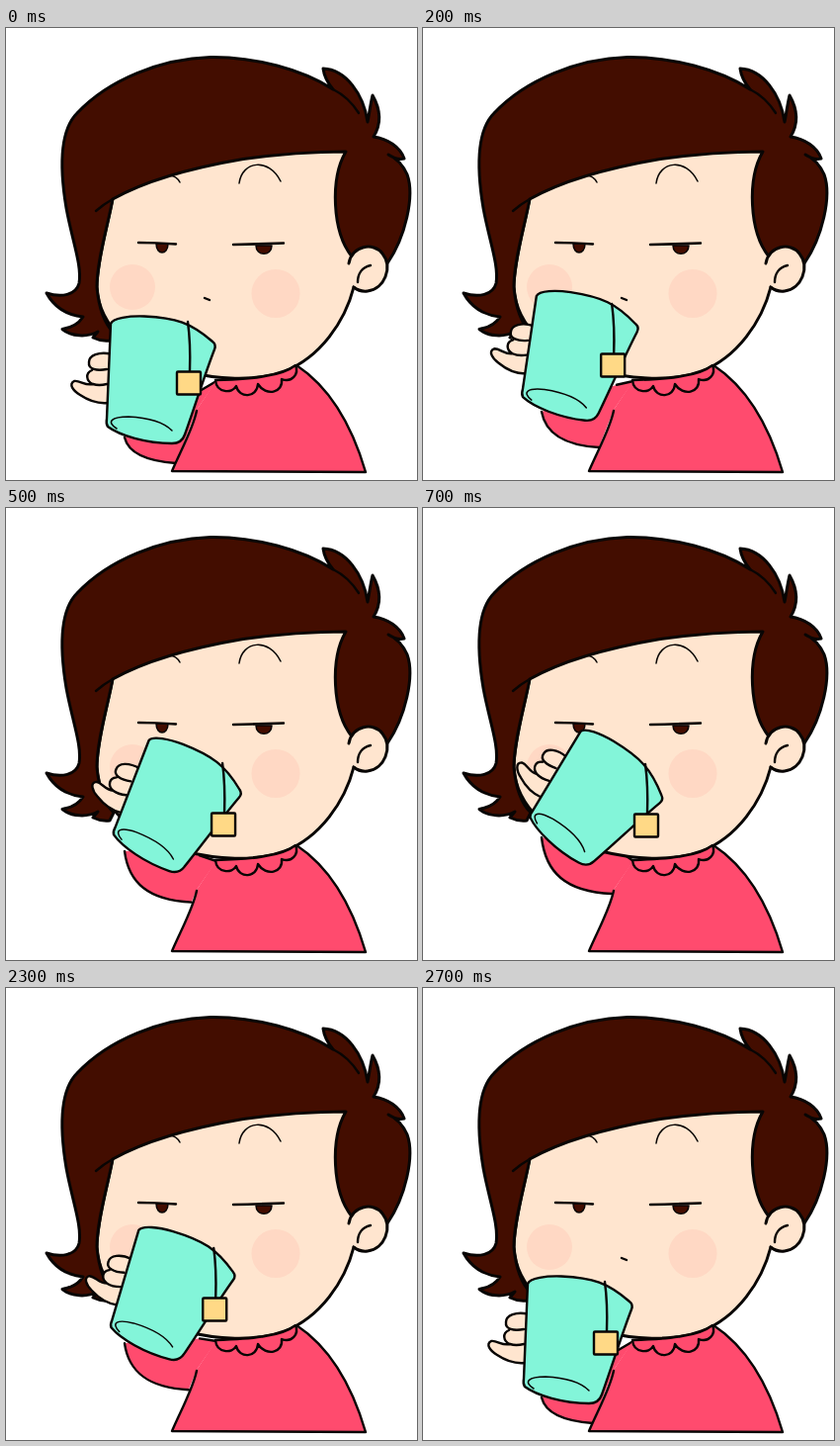
Recreate the animation shown at these times as an HTML page. Size 416x457 px, loop 4300 ms.

```html
<!DOCTYPE html>
<html lang="en">
<head>
<meta charset="utf-8">
<title>Tea sip</title>
<style>
  html, body { margin: 0; width: 100%; height: 100%; overflow: hidden; background: #fff; }
  svg { display: block; width: 100vw; height: 100vh; }
  .ink { fill: none; stroke: #080504; stroke-width: 3; stroke-linecap: round; stroke-linejoin: round; }
  .thin { stroke-width: 1.5; }
  .mid { stroke-width: 2.4; }
  .skin { fill: #ffe5cf; }
  .hair { fill: #430d00; }
  .pink { fill: #ff4b6e; }
  .mint { fill: #83f5d9; }
  .tag { fill: #ffd986; }
  .blush { fill: #ffd8c4; }
</style>
</head>
<body>
<svg viewBox="0 0 416 457">
  <!-- body and sleeve -->
  <path id="sleeveFill" class="pink"/>
  <path id="sleeveLine" class="ink mid"/>
  <path id="shoulder" class="ink mid"/>
  <path class="pink" d="M168 448 C177 430 189 408 193 386 L213 356 L292 341 C332 366 352 408 364 449Z"/>
  <path class="ink mid" d="M193 387 C189 406 176 429 168 448 L364 449 C352 408 332 366 294 341"/>

  <!-- face -->
  <path class="ink skin" d="M108 172 C103 200 92 235 92 262 C94 302 130 334 180 347 C212 355 252 358 282 347 C318 333 343 297 352 262 L362 235 L343 115 L180 125Z"/>
  <circle class="blush" cx="128" cy="262" r="23"/>
  <circle class="blush" cx="273" cy="268.500" r="24.500"/>
  <path class="ink mid pink" d="M212 356 C213 369 229 370 233 362 C236 375 254 374 255 360 C263 373 281 369 279 355 C289 359 297 350 293 341 Q283 349 262 352 Q248 355 212 356Z"/>

  <!-- hair -->
  <path class="ink hair" d="M344 125 C328 152 330 206 350 231 L386 238 C404 212 414 170 406 148 C402 139 396 132 387 128 C393 132 399 133 403 132 C399 120 386 112 372 110 C380 97 379 82 371 68 C369 76 368 85 366 95 C362 67 344 42 321 41 C322 49 326 56 331 62 C300 42 252 29 207 29.500 C157 31 104 52 72 86 C54 104 54 140 61 182 C67 215 77 240 74 258 C71 270 56 273 41 268 C48 281 60 290 78 292 C73 300 66 303 57 304.500 C66 312 82 313 93 307 L88 313 Q96 317 105 316 L109 308 C100 299 94 284 92 262 C92 235 103 200 108 173 C140 155 190 141 240 132.500 C280 127 320 125 344 125Z"/>
  <path class="ink mid" d="M108 173 Q99 178 91 185 M331 62 Q347 70 357 86"/>

  <!-- ear -->
  <path class="ink skin" d="M347 238 C350 220 372 216 381 228 C392 242 383 264 366 266 Q358 267 352 262"/>
  <path class="skin" d="M348 239 L356 233 L360 258 L351 260Z"/>
  <path class="ink mid" d="M369 240 C360 242 356 249 356 257"/>

  <!-- features -->
  <path class="ink thin" d="M166 149 Q173 150 176 156 M236 157 C239 134 266 131 278 155"/>
  <path class="hair ink thin" d="M152 218 H164 C164 230 152 230 152 218Z M253 220 H269 C269 231 253 231 253 220Z"/>
  <path class="ink mid" d="M134 217 Q152 217 172 218.500 M230 219 Q255 218.500 281 217.500"/>
  <path class="ink mid" d="M201 273 L206 275"/>

  <!-- hand and mug turn as one piece -->
  <g id="cup">
    <path class="skin" d="M108 329 C94 327 84 331 84 338 Q83 343 87 346 C80 349 81 357 87 360 C80 362 75 356 69 357 C63 360 68 367 75 371 C84 377 93 380 106 379Z"/>
    <path class="ink mid" d="M106 329.500 C94 327 84 331 84 338 C83 345 92 347 102 345 M87 346 C80 349 81 357 88 360 Q94 362 102 360 M88 360 C80 362 75 356 69 357 C63 360 68 367 75 371 C84 377 93 380 103 379"/>
    <path class="ink mid mint" d="M106 299 C108 293 125 291 140 291.500 C172 293 187 298 209 317 Q213 320 211 325 C202 348 190 386 181 411 Q178 420 168 420 C142 420 115 412 103 403 Q101 400 102 395 Q104 345 106 299Z"/>
    <path class="ink thin" d="M112 405 C101 398 107 393 124 393 C145 394 160 399 168 407"/>
  </g>
  <g id="bag">
    <path class="ink mid" d="M-1 -62 Q2 -40 1 -12"/>
    <rect class="ink mid tag" x="-12" y="-11.500" width="24" height="23" rx="1"/>
  </g>
</svg>
<script>
  const LOOP = 4300, STEP = 100, STEPS = 7, DOWN = 2000;
  const set = (id, name, value) => document.getElementById(id).setAttribute(name, value);
  const bezier = (p, a, b, c, d) => {
    const q = 1 - p;
    return a * q ** 3 + 3 * b * p * q * q + 3 * c * p * p * q + d * p ** 3;
  };

  // 0 is the resting cup, 1 the full sip
  function liftAt(t) {
    const steps = t < DOWN ? Math.floor(t / STEP) : STEPS - Math.floor((t - DOWN) / STEP);
    return Math.max(0, Math.min(STEPS, steps)) / STEPS;
  }

  function draw(p) {
    const cupX = bezier(p, 106, 106, 150, 160);
    const cupY = bezier(p, 298, 267, 225, 225);
    const turn = bezier(p, 0, 5.5, 16.7, 28.7);
    set("cup", "transform",
      `translate(${cupX} ${cupY}) rotate(${turn}) scale(1 ${1 - 0.03 * p}) translate(-106 -298)`);

    const bagX = bezier(p, 185, 180, 233, 226);
    const bagY = bezier(p, 359, 340, 309, 321);
    set("bag", "transform", `translate(${bagX} ${bagY})`);

    const wristY = bezier(p, 414, 389, 338, 333);
    const elbowY = bezier(p, 440, 425, 393, 390);
    const elbowX = 172 + 0.38 * (440 - elbowY);
    const curve = `M120 ${wristY} C124 ${wristY + (elbowY - wristY) * 0.62} 144 ${elbowY - 2} ${elbowX} ${elbowY}`;
    const shoulderY = 367 - 22 * p;
    set("sleeveLine", "d", curve);
    set("sleeveFill", "d", `${curve} L193 386 L213 357 L196 ${shoulderY}Z`);
    set("shoulder", "d", `M213 357 L196 ${shoulderY}`);
  }

  const start = performance.now();
  function tick() {
    draw(liftAt((performance.now() - start) % LOOP));
    requestAnimationFrame(tick);
  }
  tick();
</script>
</body>
</html>
```
